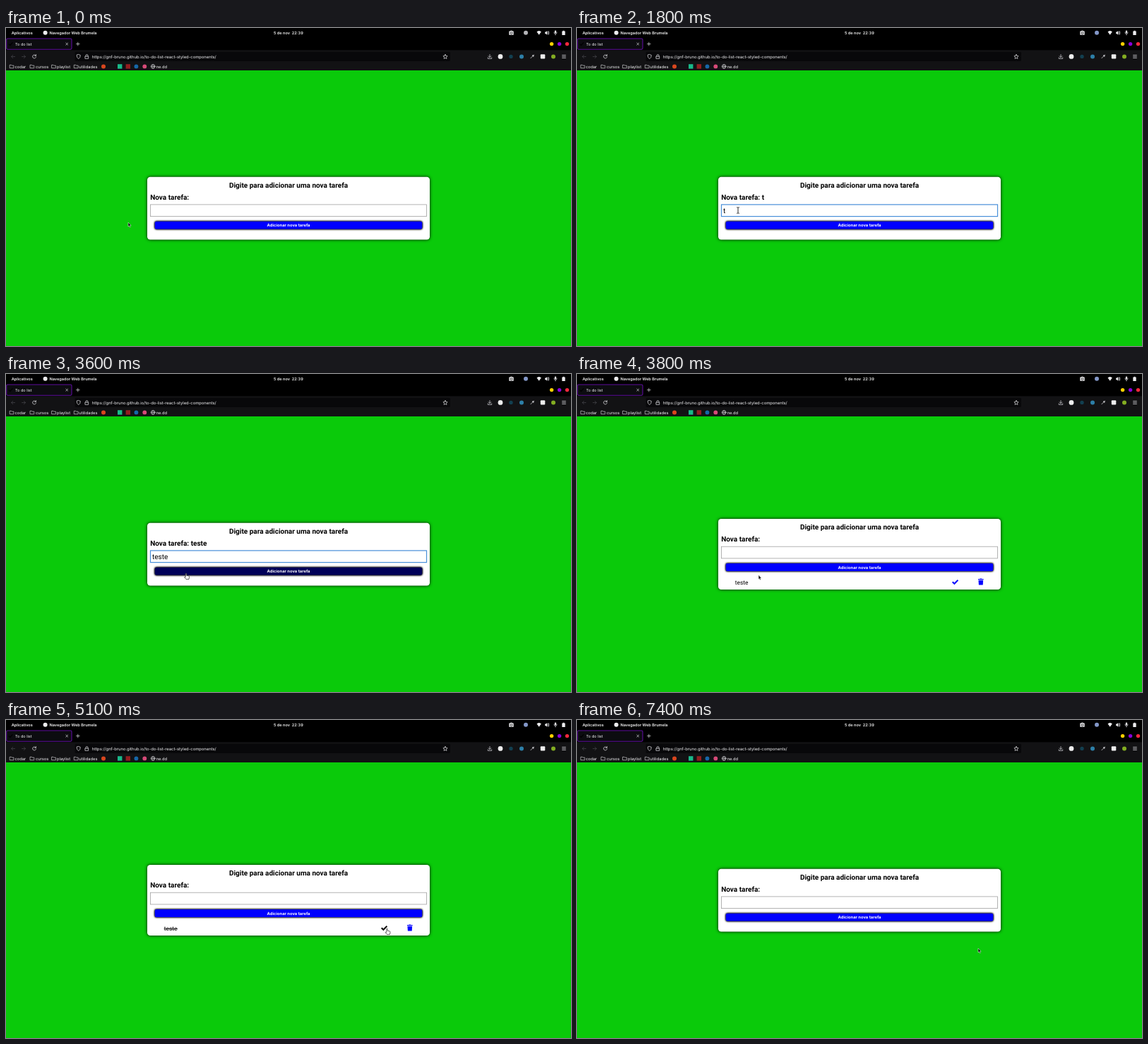
An HTML page that plays this animation: 800 by 450 pixels, repeating every 7900 ms.

```html
<!DOCTYPE html>
<html lang="pt-BR">
<head>
<meta charset="utf-8">
<title>To do list</title>
<style>
html, body { margin: 0; width: 100%; height: 100%; overflow: hidden; background: #0aca0a; }
svg { display: block; width: 800px; height: 450px; }
text { white-space: pre; text-rendering: geometricPrecision; }
.ui { font: 5.75px Inter, sans-serif; fill: #f4f4f6; }
.bar { font: 600 5.6px Inter, sans-serif; fill: #f2f2f2; }
.head { font: 700 10px Roboto, sans-serif; }
.line { fill: none; stroke: #d8d8dc; stroke-width: .75; stroke-linecap: round; stroke-linejoin: round; }
.dim { stroke: #44444a; }
.solid { fill: #ececee; }
#panel { fill: #fff; filter: drop-shadow(0 0 2px #000); }
#button { fill: #00f; filter: drop-shadow(0 0 1px #000) drop-shadow(0 0 1px #000); }
#button.hover { fill: #000058; }
#field { fill: #fff; stroke: #a0a0a0; stroke-width: .8; }
#field.focus { stroke: #4a90d9; stroke-width: 1.2; }
#label { font: 700 5.83px Inter, sans-serif; fill: #fff; }
#value { font: 10px Roboto, sans-serif; }
#item { font: 8.33px Roboto, sans-serif; }
#check { fill: none; stroke: #00f; stroke-width: 2; }
#check.hover { stroke: #000; }
#trash { fill: #00f; }
#trash.hover { fill: #000; }
.off { display: none; }
</style>
</head>
<body>
<svg viewBox="0 0 800 450">
  <defs>
    <path id="folder" class="line" d="M.8 1.5H2.7L3.4 2.3H6.2V5.9H.8Z" style="stroke-width:.65"/>
  </defs>

  <!-- System bar -->
  <rect width="800" height="450" fill="#0aca0a"/>
  <rect width="800" height="60" fill="#000"/>
  <g class="bar">
    <text x="7.7" y="8.6">Aplicativos</text>
    <text x="61.5" y="8.6">Navegador Web Brumela</text>
    <text x="379" y="8.6">5 de nov  22:39</text>
  </g>
  <circle class="solid" cx="55.6" cy="6.8" r="3"/>
  <path class="solid" d="M712.3 4.6H713.8L714.4 3.7H716.6L717.2 4.6H718.7V9.8H712.3Z"/>
  <circle cx="715.5" cy="7.1" r="1.5" fill="none" stroke="#000" stroke-width=".7"/>
  <circle id="tray" cx="736" cy="6.8" r="3"/>
  <path class="solid" d="M751.6 5.4Q754.7 2.8 757.8 5.4L754.7 9.8Z"/>
  <path class="solid" d="M763.2 5.6H764.5L766.3 4V9.8L764.5 8.2H763.2Z"/>
  <path class="line" d="M767.3 5.4Q768.3 6.9 767.3 8.4M768.3 4.4Q770 6.9 768.3 9.4"/>
  <rect class="solid" x="776.8" y="3.5" width="2.4" height="4" rx="1.2"/>
  <path class="line" d="M775.9 6.5Q776 8.4 778 8.4T780.1 6.5M778 8.4V10"/>
  <path class="solid" d="M787.3 4.6H788.6V3.7H790.4V4.6H791.7V10H787.3Z"/>

  <!-- Tabs -->
  <rect x=".7" y="15" width="92.3" height="15.2" rx="1.6" fill="#0c0c10" stroke="#5c0c9c" stroke-width="1.1"/>
  <path d="M4 22.6L5.8 24.5L9.4 20.4" fill="none" stroke="#000" stroke-width="1.2"/>
  <text class="ui" x="13" y="24.6" style="font-size:5.5px">To do list</text>
  <path class="line" d="M84.8 21.2L87.6 24M87.6 21.2L84.8 24M99.5 22.6H104.1M101.8 20.3V24.9"/>
  <circle cx="772.6" cy="22.6" r="2.7" fill="#ffd000"/>
  <circle cx="783.6" cy="22.6" r="2.7" fill="#8a00dc"/>
  <circle cx="794.5" cy="22.6" r="2.7" fill="#f5283c"/>

  <!-- Toolbar -->
  <rect y="31.3" width="800" height="28.7" fill="#121214"/>
  <rect x="97.5" y="33.7" width="531.5" height="13.2" rx="1.7" fill="#08080a"/>
  <path class="line dim" d="M12.6 40.5H7.6M9.8 38.3L7.6 40.5L9.8 42.7M22.6 40.5H27.6M25.4 38.3L27.6 40.5L25.4 42.7"/>
  <path class="line" d="M42 38.7A2.5 2.5 0 1 0 42.6 41M42.5 37.6V39.4H40.7"/>
  <path class="line" d="M102.7 37.5L105.3 38.4Q105.5 42 102.7 43.6Q99.9 42 100.1 38.4Z"/>
  <path class="line" d="M112.3 40H116.7V43.3H112.3ZM113.1 40V38.7Q113.1 37.5 114.5 37.5T115.9 38.7V40"/>
  <text class="ui" x="121.8" y="42.5" style="font-size:5.83px">https://gnf-bruno.github.io/to-do-list-react-styled-components/</text>
  <path class="line" d="M622 37.4L622.9 39.4L625.1 39.7L623.5 41.2L623.9 43.4L622 42.3L620.1 43.4L620.5 41.2L618.9 39.7L621.1 39.4Z"/>
  <path class="line" d="M685 37.6V41.4M683.2 39.8L685 41.6L686.8 39.8M682.3 41.9V43.3H687.7V41.9M787.6 38.4H792.4M787.6 40.4H792.4M787.6 42.4H792.4"/>
  <circle cx="700" cy="40.4" r="3.4" fill="#eee"/>
  <circle cx="715" cy="40.4" r="2.7" fill="#123f50"/>
  <circle cx="730" cy="40.4" r="3" fill="#2d7fa8"/>
  <path class="line" d="M742.9 42.7L746 39.6" stroke-width="1"/>
  <path class="line" d="M745.5 38.8L746.9 40.2M746.2 39.4L747.3 38.3" style="stroke-width:1.2"/>
  <rect x="756.8" y="37.2" width="6.5" height="6.4" rx="1.1" fill="#eee"/>
  <circle cx="775" cy="40.6" r="3" fill="#83ad22"/>

  <!-- Bookmarks -->
  <use href="#folder" x="4.8" y="50.8"/>
  <use href="#folder" x="33.6" y="50.8"/>
  <use href="#folder" x="64.2" y="50.8"/>
  <use href="#folder" x="95.9" y="50.8"/>
  <g class="ui">
    <text x="12.5" y="56.5">codar</text>
    <text x="41.9" y="56.5">cursos</text>
    <text x="72" y="56.5">playlist</text>
    <text x="103.3" y="56.5">utilidades</text>
    <text x="212.7" y="56.5">ne.dd</text>
  </g>
  <circle cx="138" cy="54.4" r="3" fill="#d9461e"/>
  <rect x="158" y="51.2" width="6.4" height="6.4" fill="#19b98a"/>
  <rect x="169.6" y="51.2" width="6.4" height="6.4" fill="#941c20"/>
  <circle cx="184.4" cy="54.4" r="2.9" fill="#1767a8"/>
  <circle cx="196.3" cy="54.4" r="2.9" fill="#d64a78"/>
  <g class="line" style="stroke-width:.6">
    <circle cx="208.2" cy="54.4" r="2.9"/>
    <ellipse cx="208.2" cy="54.4" rx="1.3" ry="2.9"/>
    <path d="M205.3 54.4H211.1"/>
  </g>

  <!-- Page -->
  <g id="card">
    <rect id="panel" x="200" y="210.8" width="400" height="88.8" rx="4.2"/>
    <text class="head" x="400" y="225.6" text-anchor="middle">Digite para adicionar uma nova tarefa</text>
    <text class="head" id="echo" x="204.2" y="243"></text>
    <rect id="field" x="204.5" y="249.9" width="391" height="16.7"/>
    <text id="value" x="207" y="261.7"></text>
    <path id="caret" d="M230.3 252.8V264" stroke="#000" stroke-width=".6"/>
    <rect id="button" x="210.8" y="273.8" width="378.4" height="10.8" rx="2"/>
    <text id="label" x="400" y="281.3" text-anchor="middle">Adicionar nova tarefa</text>
    <g id="task">
      <text id="item" x="223.8" y="304">teste</text>
      <path id="strike" d="M223.6 301.4H243.2" stroke="#000" stroke-width=".8"/>
      <path id="check" d="M531.7 299.9L534.4 302.5L539.4 297.3"/>
      <path id="trash" d="M568 295.8H570.2L570.7 295.2H572.9L573.4 295.8H575.6V297H568ZM568.5 297.6H575.1L574.7 304.2H568.9Z"/>
    </g>
  </g>

  <g id="pointer">
    <path id="arrow" d="M0 0V6L1.3 4.9L2.2 7L3.3 6.5L2.4 4.5L4.1 4.3Z" fill="#111" stroke="#fff" stroke-width=".45"/>
    <path id="beam" d="M-1.8 -4.2H-.5L0 -3.7L.5 -4.2H1.8M0 -3.7V3.7M-1.8 4.2H-.5L0 3.7L.5 4.2H1.8" fill="none" stroke="#111" stroke-width=".9"/>
    <path id="hand" d="M-.7 .5Q0 -.5 .7 .5V3.2L3.5 3.8Q4.6 4.1 4.5 5.2L4 8.4H-.1L-2.3 5.7Q-2.4 4.6 -.7 5.4Z" fill="#fff" stroke="#111" stroke-width=".65" stroke-linejoin="round"/>
  </g>
</svg>

<script>
const LOOP = 7900, STEP = 100, LIFT = -5.7;
const $ = id => document.getElementById(id);

// Pointer path: time, x, y
const path = [
  [0, 173, 275], [300, 196, 268], [500, 228, 258], [3200, 228, 258],
  [3400, 240, 272], [3500, 251, 280], [3600, 255, 282], [3700, 256, 283],
  [3900, 258, 286], [4000, 259, 288], [4200, 300, 303], [4400, 385, 312],
  [4600, 485, 306], [4800, 539.5, 295], [6200, 539.5, 295], [6400, 556, 297],
  [6600, 573, 291], [7000, 573, 291], [7200, 571, 306], [7400, 568, 323]
];
const typing = [[1800, 't'], [1900, 'te'], [2100, 'tes'], [2300, 'test'], [2500, 'teste'], [3800, '']];

const during = (t, from, to) => t >= from && t < to;
const inside = (p, x0, y0, x1, y1) => p[0] >= x0 && p[0] <= x1 && p[1] >= y0 && p[1] <= y1;
const show = (id, on) => $(id).classList.toggle('off', !on);
const mark = (id, name, on) => $(id).classList.toggle(name, on);

function pointerAt(t) {
  const i = path.findIndex(k => k[0] > t);
  if (i < 0) return path[path.length - 1].slice(1);
  const [t0, x0, y0] = path[i - 1], [t1, x1, y1] = path[i];
  const f = (t - t0) / (t1 - t0);
  return [x0 + (x1 - x0) * f, y0 + (y1 - y0) * f];
}

function draw(t) {
  const p = pointerAt(t);
  const listed = during(t, 3800, 7000);
  const dy = listed ? LIFT : 0;
  const typed = (typing.filter(k => k[0] <= t).pop() || [0, ''])[1];

  const onField = inside(p, 204, 250 + dy, 596, 267 + dy);
  const onButton = inside(p, 210, 273.5 + dy, 590, 285 + dy);
  const onCheck = listed && inside(p, 530, 289, 541, 299);
  const onTrash = listed && inside(p, 567, 289, 577, 299);
  const onLink = onButton || onCheck || onTrash;

  $('card').setAttribute('transform', `translate(0 ${dy})`);
  $('panel').setAttribute('height', listed ? 100 : 88.8);
  $('echo').textContent = 'Nova tarefa: ' + typed;
  $('value').textContent = typed;
  $('tray').setAttribute('fill', t < 100 ? '#b4b4b8' : '#8397c8');

  mark('field', 'focus', during(t, 600, 3800));
  mark('button', 'hover', onButton);
  mark('check', 'hover', onCheck);
  mark('trash', 'hover', onTrash);
  show('caret', during(t, 2600, 3000));
  show('task', listed);
  show('strike', during(t, 5000, 6100));
  show('beam', onField);
  show('hand', onLink);
  show('arrow', !onField && !onLink);
  $('pointer').setAttribute('transform', `translate(${p[0]} ${p[1]})`);
}

const start = performance.now();
function tick() {
  const t = (performance.now() - start) % LOOP;
  draw(Math.floor(t / STEP) * STEP);
  requestAnimationFrame(tick);
}
tick();
</script>
</body>
</html>
```
